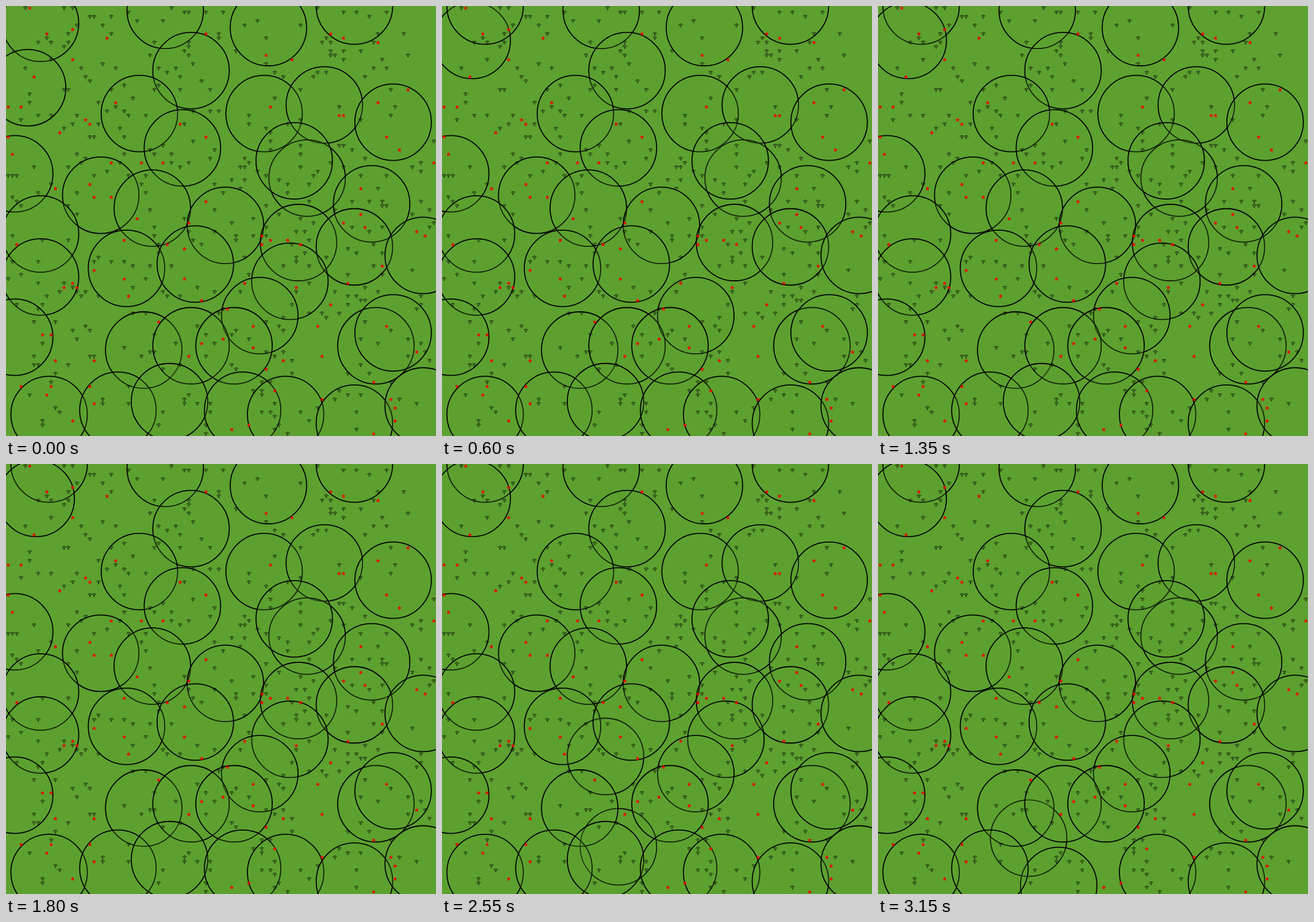
These frames come from a looping animation (748 px wide and 748 px high, 8 s). An HTML page with a canvas:

```html
<!DOCTYPE html>
<html>
<head>
<meta charset="utf-8">
<style>
html, body { margin: 0; width: 100%; height: 100%; overflow: hidden; background: #5da130 }
canvas { display: block }
</style>
</head>
<body>
<canvas id="stage" width="748" height="748"></canvas>
<script>
const ctx = document.getElementById('stage').getContext('2d');
const CELL = 7.48, LOOP = 8000;

// Places on the 100 x 100 grid are written as row * 100 + column.
const ranges = [
  408, 1905, 137, 561, 81, 1543, 2531, 2560, 2374, 2790, 3341, 4070, 3667, 3902,
  4422, 4734, 5151, 4685, 5308, 6308, 6128, 6044, 5568, 5681, 5897, 6466, 7259,
  7702, 8032, 7943, 7953, 7986, 7690, 9510, 9426, 9238, 9455, 9565, 9781, 9397
];

// start, end, ranges taken away, ranges put in
const swaps = [
  [150, 900, [1905], [807]],
  [600, 750, [408, 6466], [10]],
  [1200, 1350, [2560, 3667], [3063]],
  [1350, LOOP, [408, 1905], [10, 807]],
  [2250, 2400, [3667, 5568], [4562]],
  [3150, LOOP, [9238], [8735]]
];
for (const start of [450, 2100, 2550]) swaps.push([start, start + 150, [7943], [6838, 8941]]);
for (const [start, end] of [[1200, 1350], [1500, 1800], [3000, LOOP]]) swaps.push([start, end, [9455], [9842]]);

// Signals and stars are scattered over the grid, each in a cell of its own.
let seed = 71;
const random = () => (seed = seed * 16807 % 2147483647) / 2147483647;
const scattered = new Set();
while (scattered.size < 500) scattered.add(Math.floor(random() * 10000));
const stars = [...scattered].slice(0, 100);
const signals = [...scattered].slice(100);

function at(place, offset, draw) {
  ctx.save();
  ctx.translate((place % 100 + offset) * CELL, (Math.floor(place / 100) + offset) * CELL);
  ctx.beginPath();
  draw();
  ctx.restore();
}

function drawRange() {
  ctx.arc(0.2, 0.1, 66.5, 0, 2 * Math.PI);
  ctx.fillStyle = 'rgba(93,161,48,.2)';
  ctx.fill();
  ctx.lineWidth = 1.8;
  ctx.stroke();
}

function drawSignal() {
  ctx.lineWidth = 0.95;
  for (const r of [2.6, 4.9]) {
    ctx.beginPath();
    ctx.arc(0, 2.3, r, -Math.PI * 0.79, -Math.PI * 0.21);
    ctx.stroke();
  }
  ctx.fillStyle = '#000';
  ctx.fillRect(-0.8, 1.4, 1.6, 1.6);
}

function drawStar() {
  for (let i = 0; i < 10; i++) {
    const r = i % 2 ? 1.6 : 4.1, a = (i / 5 - 0.5) * Math.PI;
    ctx.lineTo(r * Math.cos(a), r * Math.sin(a));
  }
  ctx.fillStyle = '#f00000';
  ctx.fill();
}

function frame(now) {
  const t = now % LOOP;
  const active = swaps.filter(([start, end]) => t >= start && t < end);
  const gone = active.flatMap(swap => swap[2]);
  const added = active.flatMap(swap => swap[3]);
  const shown = [...added, ...ranges.filter(p => !gone.includes(p))];
  ctx.fillStyle = '#5da130';
  ctx.fillRect(0, 0, 748, 748);
  shown.forEach(p => at(p, 0, drawRange));
  signals.forEach(p => at(p, 0.5, drawSignal));
  stars.forEach(p => at(p, 0.5, drawStar));
  requestAnimationFrame(frame);
}
requestAnimationFrame(frame);
</script>
</body>
</html>
```
